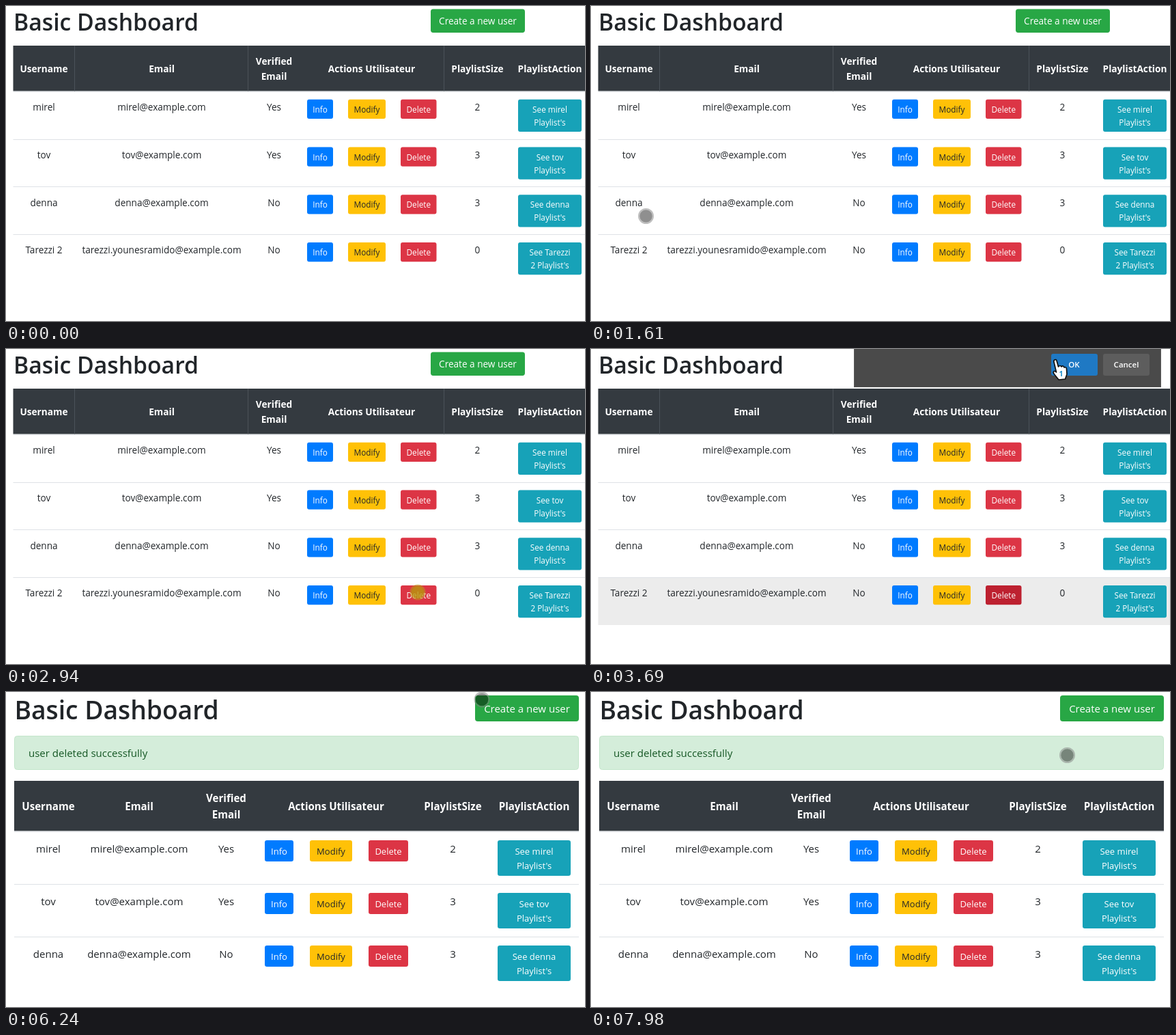
Animation of 848 by 461 pixels, one loop 8 s. Source, as an HTML page:

```html
<!DOCTYPE html>
<html lang="en">
<head>
<meta charset="utf-8">
<title>Basic Dashboard</title>
<style>
  html, body { margin: 0; width: 100%; height: 100%; overflow: hidden; background: #fff; }
  svg { display: block; width: 848px; height: 461px; }
  text { font-family: "Open Sans", "Noto Sans", sans-serif; fill: #212529; }
  .mid { text-anchor: middle; }
  .white { fill: #fff; font-weight: 500; }
  .bold { font-weight: 700; }
  .semi { font-weight: 600; }
  .alert { fill: #155724; }
</style>
</head>
<body>
<svg viewBox="0 0 848 461">
  <g id="before"></g>
  <g id="after"></g>
  <g id="dialog">
    <rect x="385" y="-4" width="450" height="60" fill="#4a4a4a"/>
    <path d="M385.5 0V55.5H834.5V0" fill="none" stroke="#5a5a5a"/>
    <rect id="ok" x="674" y="7" width="68" height="32" rx="3"/>
    <rect x="750" y="7" width="68" height="32" rx="3" fill="#5d5d5d"/>
    <text class="mid white semi" x="707.5" y="27" font-size="11.5">OK</text>
    <text class="mid white semi" x="784" y="27" font-size="11.5">Cancel</text>
  </g>
  <g id="disc">
    <circle id="halo" r="10.4" fill="none" stroke-width="2.2"/>
    <circle id="core" r="9.3"/>
  </g>
  <g id="hand">
    <path d="M-3 3C-4 0 0-2 1 1L3.5 10C4.5 8 7.5 8 8 10C9.5 8 11.5 9 12 11C13.5 10 15.5 11 15.5 13L16 21L13.5 28L4 29L-2.5 21C-5.5 17-2.5 15 0.5 18Z"
      fill="#fff" stroke="#111" stroke-width="1.7" stroke-linejoin="round"/>
    <text class="mid bold" x="7.5" y="23.5" font-size="10.5" style="fill:#1c8fcb">1</text>
  </g>
</svg>
<script>
const LOOP = 8000;
const $ = id => document.getElementById(id);

const text = (x, y, str, size, cls = "mid") =>
  `<text x="${x}" y="${y}" font-size="${size}" class="${cls}">${str}</text>`;
const rect = (x, y, w, h, fill, extra = "") =>
  `<rect x="${x}" y="${y}" width="${w}" height="${h}" fill="${fill}" ${extra}/>`;

const users = [
  ["mirel", "mirel@example.com", "Yes", 2],
  ["tov", "tov@example.com", "Yes", 3],
  ["denna", "denna@example.com", "No", 3],
  ["Tarezzi 2", "tarezzi.younesramido@example.com", "No", 0],
];
const heads = ["Username", "Email", "Verified Email", "Actions Utilisateur", "PlaylistSize", "PlaylistAction"];
const actions = [["Info", "#007bff", "white"], ["Modify", "#ffc107", ""], ["Delete", "#dc3545", "white"]];

// k is the page zoom; cols are column centres; buttons are [left, right] pairs
function page({ k, left, right, top, cols, buttons, create, list, seams = [] }) {
  const body = 15 * k, small = 13 * k, bold = 15.1 * k;
  const round = `rx="${3.2 * k}"`;
  let out = text(left + 0.5, 39.7 * k, "Basic Dashboard", 37.2 * k, "semi");

  out += rect(create[0], 5 * k, create[1] - create[0], 38 * k, "#28a745", `rx="${4 * k}"`);
  out += text((create[0] + create[1]) / 2, 30 * k, "Create a new user", body, "mid white");

  out += rect(left, top, right - left, 73.3 * k, "#343a40");
  for (const x of seams) out += rect(x, top, 1, 73.3 * k, "#4b5259");
  heads.forEach((head, i) => {
    const put = (str, dy) => out += text(cols[i], top + dy * k, str, bold, "mid white bold");
    if (i === 2) head.split(" ").forEach((word, n) => put(word, 31 + 24 * n));
    else put(head, 43);
  });

  list.forEach(([name, mail, verified, size], i) => {
    const y = top + (74.5 + 77 * i) * k;
    const by = y + 12.5 * k;
    const last = i === users.length - 1;
    if (last) out += rect(left, Math.round(y), right - left, 69, "#ececec", 'id="rowHover"');
    out += rect(left, Math.round(y - 0.6), right - left, 1, "#dee2e6");
    [[0, name], [1, mail], [2, verified], [4, size]].forEach(([c, str]) =>
      out += text(cols[c], y + 30.5 * k, str, body));

    actions.forEach(([label, fill, cls], n) => {
      const [a, b] = buttons[n];
      if (last && n === 2)
        out += rect(a - 1.5, by - 1.5, b - a + 3, 31 * k + 3, "none",
          'id="focusRing" rx="4" stroke="#e15361" stroke-opacity=".5" stroke-width="3"');
      out += rect(a, by, b - a, 31 * k, fill, round + (last && n === 2 ? ' id="lastDelete"' : ""));
      out += text((a + b) / 2, by + 21 * k, label, small, "mid " + cls);
    });

    const [a, b] = buttons[3], words = name.split(" ");
    out += rect(a, by, b - a, 52 * k, "#17a2b8", round);
    out += text((a + b) / 2, by + 21 * k, "See " + words[0], small, "mid white");
    out += text((a + b) / 2, by + 42 * k, [...words.slice(1), "Playlist's"].join(" "), small, "mid white");
  });
  return out;
}

$("before").innerHTML = page({
  k: 0.906, left: 10.5, right: 848, top: 58,
  cols: [55.5, 228, 392.5, 535.5, 690.5, 796.5],
  buttons: [[441, 479], [501, 556], [578, 630.5], [750, 843]],
  create: [622, 760], list: users, seams: [100, 354, 641],
});

$("after").innerHTML =
  rect(12.5, 64.5, 826, 49, "#d4edda", 'rx="4" stroke="#c3e6cb"') +
  text(33, 95, "user deleted successfully", 15, "alert") +
  page({
    k: 1, left: 12, right: 839, top: 130,
    cols: [62, 195, 322.5, 483.5, 654.5, 773.5],
    buttons: [[379, 421], [445, 507], [531, 589], [720, 827]],
    create: [687, 839], list: users.slice(0, 3),
  });

// Pointer moves: start, end, then the stops taken at even steps between them
const moves = [
  [660, 870, "679,451 247,397 92,402 48,367"],
  [1130, 1890, "52,385 62,402 80,413 103,408 124,385 130,350 115,318 80.5,307.5 40,318 12,345 15,322 33,310"],
  [1960, 2100, "95,330 180,360 257,373"],
  [2300, 2720, "290,371 350,367 420,361 490,355 550,351 590,352 603,356"],
  [3540, 4040, "625,270 668,90 681,16 684,12 688,8 691,6 692,5 693,4"],
  [4300, 4300, "697,11"],
  [6830, 6970, "670,50 620,130 580,196"],
  [7700, 7980, "592,188 625,160 660,130 688,105 697.5,92.5"],
].map(([from, to, stops]) => ({ from, to, stops: stops.split(" ") }));

function pointer(t) {
  const move = moves.filter(m => m.from <= t).pop();
  if (!move) return null;
  const { from, to, stops } = move, end = stops.length - 1;
  const step = Math.floor((t - from) / Math.max(1, to - from) * end + 0.1);
  return stops[Math.min(end, step)];
}

const within = (t, a, b) => t >= a && t < b;
const show = (id, on) => $(id).setAttribute("display", on ? "inline" : "none");

function render(t) {
  show("before", t < 6240);
  show("after", t >= 6240);
  show("dialog", within(t, 3140, 4570));
  show("rowHover", t >= 3140);
  show("focusRing", t >= 4570);
  $("lastDelete").setAttribute("fill", t < 3140 ? "#dc3545" : t < 4570 ? "#bd2130" : "#c82333");
  $("ok").setAttribute("fill", t < 3680 ? "#1a80d0" : t < 4300 ? "#1f79c4" : "#1b6bb0");

  const at = pointer(t), hand = within(t, 3680, 4300);
  const click = within(t, 2940, 3140) || within(t, 4300, 4570);
  show("disc", at && !hand);
  show("hand", hand);
  if (at) $(hand ? "hand" : "disc").setAttribute("transform", `translate(${at})`);
  $("halo").setAttribute("stroke", click ? "rgba(190,160,20,.5)" : "rgba(128,128,128,.5)");
  $("core").setAttribute("fill", click ? "rgba(182,152,12,.8)" : "rgba(0,0,0,.44)");
}

const start = performance.now();
(function tick() {
  render((performance.now() - start) % LOOP);
  requestAnimationFrame(tick);
})();
</script>
</body>
</html>
```
